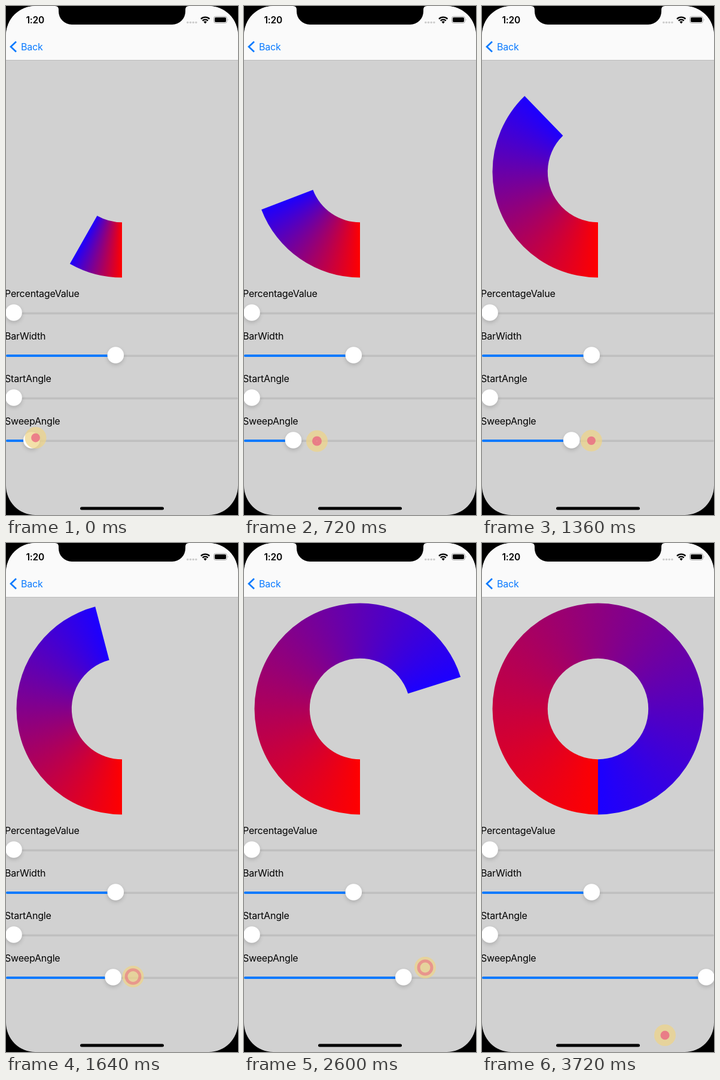
These frames come from a looping animation (388 by 850 pixels, 3.76 s). An HTML page with a canvas:

```html
<!DOCTYPE html>
<html lang="en">
<head>
<meta charset="utf-8">
<title>Sweep angle</title>
<style>
  html, body { margin: 0; width: 100%; height: 100%; overflow: hidden; background: #000; }
  #stage {
    position: relative; width: 388px; height: 850px; overflow: hidden;
    background: #d1d1d1; border-radius: 49px;
  }
  canvas, svg { position: absolute; left: 0; display: block; }
  canvas { top: 91px; width: 388px; height: 370px; }
  svg { top: 0; }
  text { font-family: Inter, Roboto, sans-serif; font-size: 16px; letter-spacing: -.2px; }
  .thumb { fill: #fff; filter: drop-shadow(0 3px 3px rgba(0, 0, 0, .16)); }
  .track { stroke: #bfbfbf; stroke-width: 3.6; stroke-linecap: round; }
  .fill { stroke: #0a7aff; stroke-width: 4; stroke-linecap: round; }
</style>
</head>
<body>
<div id="stage">
  <canvas id="ring"></canvas>
  <svg width="388" height="850" viewBox="0 0 388 850">
    <rect width="388" height="90" fill="#fafafa"/>
    <rect y="90" width="388" height="1" fill="#bcbcbc"/>
    <path d="M82 0Q88 0 88 6V9A22 22 0 0 0 110 31H278A22 22 0 0 0 300 9V6Q300 0 306 0Z"/>
    <text x="33.5" y="29" style="font-size:15.5px;font-weight:600">1:20</text>
    <g fill="#cdcdcd">
      <circle cx="303.8" cy="27.5" r="1.8"/><circle cx="308.5" cy="27.5" r="1.8"/>
      <circle cx="313.2" cy="27.5" r="1.8"/><circle cx="317.9" cy="27.5" r="1.8"/>
    </g>
    <g fill="none" stroke="#000" stroke-width="2.3">
      <path d="M326 21.6a10.2 10.2 0 0 1 14.4 0M328.7 24.6a6.3 6.3 0 0 1 9 0"/>
    </g>
    <path d="M333.2 29.4l-2.6-2.8a3.7 3.7 0 0 1 5.2 0z"/>
    <rect x="347.5" y="17.5" width="22" height="11" rx="3.2" fill="none" stroke="#a0a0a0"/>
    <rect x="349" y="19" width="19" height="8" rx="1.8"/>
    <path d="M371 21.2q1.6 1.8 0 3.6z" fill="#a0a0a0"/>
    <path d="M17 59.5L8 68l9 8.5" fill="none" stroke="#0a7aff" stroke-width="2.7"/>
    <text x="25" y="74" fill="#0a7aff">Back</text>
    <g id="sliders"></g>
    <g id="touch">
      <circle r="18" fill="#efd488" fill-opacity=".72"/>
      <circle id="pulse" fill="none" stroke="#ea6f84"/>
    </g>
    <rect x="124" y="836.5" width="140" height="5" rx="2.5"/>
  </svg>
</div>
<script>
const LOOP = 3760, STEP = 40, TAU = Math.PI * 2;
const $ = id => document.getElementById(id);

// Each row: time in ms, then the values at that time.
const sweepKeys = [[0, 29.6], [340, 30.8], [400, 35.8], [1040, 102.4], [1640, 165.3],
  [2240, 226], [2600, 252.4], [3120, 318], [3560, 360]];
const touchKeys = [[0, 49.5, 721], [400, 95, 725], [1040, 149, 728], [1640, 212.5, 724],
  [2600, 303, 709], [3120, 357.5, 696], [3360, 375, 695], [3520, 365, 745], [3720, 306, 822]];
const pulseKeys = [[0, .41], [400, .92], [1040, 1.97], [1640, 2.77], [2600, 3.75],
  [3120, 4.94], [3720, 5.42]];

function at(keys, t) {
  const i = keys.findIndex(k => k[0] > t);
  if (i < 0) return keys[keys.length - 1].slice(1);
  const a = keys[i - 1], b = keys[i], u = (t - a[0]) / (b[0] - a[0]);
  return a.slice(1).map((v, j) => v + (b[j + 1] - v) * u);
}

function slider(label, y, x) {
  const fill = x > 13 ? `<line class="fill" x1="2" x2="${x}" y1="${y + 1}" y2="${y + 1}"/>` : '';
  return `<text x="-2" y="${y - 26}">${label}</text>
    <line class="track" x1="2" x2="386" y1="${y + 1.2}" y2="${y + 1.2}"/>${fill}
    <circle class="thumb" cx="${x}" cy="${y}" r="13.8"/>`;
}
$('sliders').innerHTML = slider('PercentageValue', 512, 13) + slider('BarWidth', 583, 183.3) +
  slider('StartAngle', 654, 13) + slider('SweepAngle', 725, 43);
const fill = [...document.querySelectorAll('.fill')].pop();
const thumb = [...document.querySelectorAll('.thumb')].pop();

const dpr = window.devicePixelRatio || 1;
const canvas = $('ring'), ctx = canvas.getContext('2d');
canvas.width = 388 * dpr;
canvas.height = 370 * dpr;
ctx.scale(dpr, dpr);

function drawRing(deg) {
  const x = 194, y = 186, from = TAU / 4, to = from + deg / 360 * TAU;
  const paint = ctx.createConicGradient(from, x, y);
  paint.addColorStop(0, '#ff0000');
  paint.addColorStop(deg / 360, '#1c00ff');
  ctx.clearRect(0, 0, 388, 370);
  ctx.beginPath();
  ctx.arc(x, y, 176.5, from, to);
  ctx.arc(x, y, 84.2, to, from, true);
  ctx.closePath();
  ctx.fillStyle = paint;
  ctx.fill();
}

function drawTouch(t) {
  const [x, y] = at(touchKeys, t);
  const outer = 18 * (at(pulseKeys, t)[0] % 1);
  const width = Math.min(outer, 11 - .44 * outer);
  $('touch').setAttribute('transform', `translate(${x} ${y})`);
  $('pulse').setAttribute('r', outer - width / 2);
  $('pulse').setAttribute('stroke-width', width);
  $('pulse').setAttribute('stroke-opacity', Math.min(.85, 1.25 - outer / 21));
}

function frame(now) {
  const t = Math.floor(now % LOOP / STEP) * STEP;
  const [deg] = at(sweepKeys, t);
  const x = 13 + deg * 362 / 360;
  drawRing(deg);
  fill.setAttribute('x2', x);
  thumb.setAttribute('cx', x);
  drawTouch(t);
  requestAnimationFrame(() => frame(performance.now() - start));
}
const start = performance.now();
frame(0);
</script>
</body>
</html>
```
